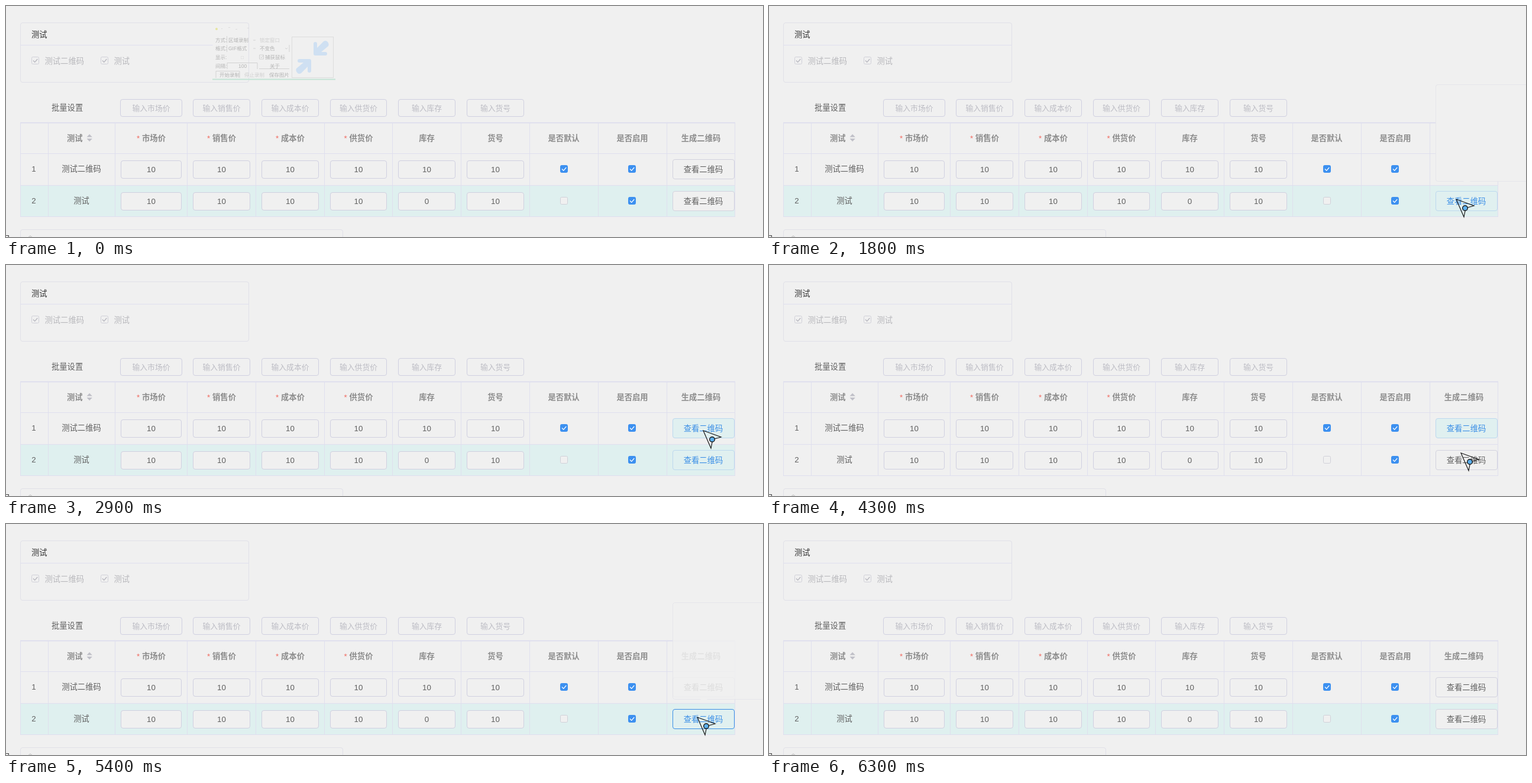
An HTML page that plays this animation: 1280 by 392 pixels, repeating every 6.4 s.

```html
<!DOCTYPE html>
<html lang="zh">
<head>
<meta charset="utf-8">
<style>
  html, body { margin: 0; height: 100%; overflow: hidden; background: #f0f0f0; }
  svg { display: block; }
  text { font: 13.3px "Liberation Sans", "Noto Sans CJK SC", "Noto Sans CJK", sans-serif; fill: #606060; }
  .mid { text-anchor: middle; }
  .head { font-weight: bold; fill: #8c8c8c; }
  .hint { font-size: 12.8px; fill: #bcbcc4; }
  .off { fill: #b8b8bc; }
  .dark { fill: #303030; }
  .star { fill: #f06a60; }
  .tiny { font-size: 8.5px; fill: #b4b4b4; }
  .faint { fill: #d0d0d0; }
  .line { fill: none; stroke: #dfdfee; }
  .card { fill: none; stroke: #e0e0e8; }
  .field { fill: #f0f0f0; stroke: #d0d0e0; }
  .btn rect { fill: #f0f0f0; stroke: #d2d2de; }
  .btn.hover rect { fill: #e0f0f0; stroke: #bcd8ee; }
  .btn.press rect { stroke: #3a8ee6; }
  .btn.hover text { fill: #3a8ee6; }
  .pop { fill: #f0f0f0; stroke: #e5e5ea; }
</style>
</head>
<body>
<svg id="stage" width="1280" height="392" viewBox="0 0 1280 392"></svg>
<script>
const stage = document.getElementById('stage');
const parts = [];
const add = s => parts.push(s);
const textAt = (x, y, s, cls = '') => `<text x="${x}" y="${y + 4.8}" class="${cls}">${s}</text>`;
const text = (...a) => add(textAt(...a));
const mid = (x, y, s, cls = '') => text(x, y, s, 'mid ' + cls);
const box = (x, y, w, h, cls, r = 3.5) =>
  `<rect x="${x + .5}" y="${y + .5}" width="${w}" height="${h}" rx="${r}" class="${cls}"/>`;
const path = (d, attrs) => `<path d="${d}" ${attrs}/>`;

function check(x, y, on, disabled) {
  const blue = on && !disabled;
  add(`<rect x="${x + .5}" y="${y + .5}" width="12" height="12" rx="2" fill="${blue ? '#3c90f0' : '#f0f0f0'}" stroke="${blue ? '#3c90f0' : '#d0d0d8'}"/>`);
  if (on) add(path(`M${x + 3} ${y + 6.5}l2.7 2.8 4.6-5.3`, `fill="none" stroke="${blue ? '#fff' : '#b4b4bc'}" stroke-width="1.2"`));
}

// Option card
add(box(24, 28, 386, 101, 'card'));
add(path('M24 66.5H410', 'class="line"'));
text(43, 48, '测试', 'dark');
check(43, 86, true, true);
text(65.5, 93, '测试二维码', 'off');
check(160, 86, true, true);
text(182.5, 93, '测试', 'off');

// Table
const rows = [277, 331];
const edges = [24, 71, 184, 306, 422, 538, 653, 769, 885, 1001, 1117, 1232];
const names = ['市场价', '销售价', '成本价', '供货价', '库存', '货号'];
add('<rect id="row" x="24" y="304" width="1209" height="54" fill="#dff0ef"/>');
add(path('M24 198.3H1233', 'class="line" stroke-width="2"'));
add(path([250, 304, 357].map(y => `M24 ${y}.5H1233`).join(''), 'class="line"'));
add(path(edges.map(x => `M${x}.5 198V358`).join(''), 'class="line"'));

text(77, 172, '批量设置');
text(103, 224, '测试', 'head');
add(path('M136.5 222.5l4.7-5 4.7 5zM136.5 225l4.7 5 4.7-5z', 'fill="#c0c0c8"'));

names.forEach((name, i) => {
  const [left, right] = edges.slice(i + 2, i + 4);
  const x = left + 10, w = right - left - 20, c = (left + right) / 2 + .5;
  const grow = i ? 0 : 1; // the first batch field is a little wider
  add(box(x - grow, 158, w + 2 * grow, 29, 'field'));
  mid(c, 173, '输入' + name, 'hint');
  if (i < 4) {
    text(c - 24.5, 224, '*', 'star');
    mid(c + 4.5, 224, name, 'head');
  } else mid(c, 224, name, 'head');
  rows.forEach((y, r) => {
    add(box(x, y - 15, w, 30, 'field'));
    mid(c, y, r && i === 4 ? 0 : 10);
  });
});

mid(943, 224, '是否默认', 'head');
mid(1059, 224, '是否启用', 'head');
mid(1175, 224, '生成二维码', 'head');
rows.forEach((y, r) => {
  mid(47, y - .5, r + 1);
  mid(127.5, y - .5, r ? '测试' : '测试二维码');
  check(937, y - 7, !r);
  check(1052, y - 7, true);
  add(`<g id="btn${r}" class="btn">${box(1127, y - 17, 104, 33, '')}${textAt(1179, y, '查看二维码', 'mid')}</g>`);
});

// Next section
add(box(24, 379, 545, 40, 'card'));
add(path('M37 393l4-3 4 3', 'fill="none" stroke="#b8b8b8"'));
text(-6, 395, '号', 'dark');

// Popovers
add(`<g id="pop0"><rect x="1128" y="226" width="152" height="23" fill="#f0f0f0"/>
  <path d="M1174 248.500h12l-6 6z" fill="#f0f0f0"/></g>`);
add(`<g id="pop1">${box(1127, 133, 160, 164, 'pop')}
  <path d="M1174 297h12l-6 6z" fill="#f0f0f0"/></g>`);

// Fading recorder window
const tiny = (x, y, s, cls = '') => textAt(x, y - 1.8, s, 'tiny ' + cls);
const arrow = 'M-13 7l12-10h-7q-3 0-3-3t3-3h17q3 0 3 3v17q0 3-3 3t-3-3v-7l-11 11q-3 2-6 0-4-4-2-8z';
add(`<g id="tool">
  <rect x="349.500" y="47" width="60" height="77" fill="#f0f0f0"/>
  <circle cx="356" cy="39" r="2" fill="#e6e6a0"/>
  <path d="M364 38.500h2m10-2h3m9 3h3m17-2h3" stroke="#dcdcdc"/>
  ${['方式:', '格式:', '显示:', '间隔:'].map((s, i) => tiny(354, 57.5 + i * 14.7, s)).join('')}
  ${tiny(376, 57.5, '区域录制')}${tiny(429, 57.5, '锁定窗口', 'faint')}
  ${tiny(376, 72, 'GIF格式')}${tiny(429, 72, '不变色')}
  ${tiny(397, 87, '□', 'faint')}${tiny(438, 87, '捕获鼠标')}
  ${tiny(393, 101.5, '100')}${tiny(446, 101.5, '关于')}
  ${tiny(361, 117, '开始录制')}${tiny(403, 117, '停止录制', 'faint')}${tiny(445, 117, '保存图片')}
  <path d="M373.500 51v12m0 3v12M418 58h4m-4 14h4m50-1l2 2 2-2m3-5v12M374 107V96.500h51V107M355 122v-11.500h40V122M428 106.500h51M428.500 83h7v7h-7zM430 86l2 2 3-4" fill="none" stroke="#d2d2d2"/>
  <rect x="483.500" y="52.500" width="70" height="69" fill="none" stroke="#dcdcdc"/>
  <g fill="#cfe0f2"><path d="${arrow}" transform="translate(504 99)"/>
  <path d="${arrow}" transform="translate(532 75) rotate(180)"/></g>
  <path d="M349 124.500H557" stroke="#c4e4d6" stroke-width="2"/></g>`);

add(`<g id="cursor"><path d="M0 0L30 11 16 15 13 30z" fill="none" stroke="#181818" stroke-width="1.2"/>
  <circle cx="15" cy="15" r="4.300" fill="#5cb0ee" stroke="#181818" stroke-width="1.400"/></g>`);

stage.innerHTML = parts.join('');
const el = id => document.getElementById(id);
const [row, btn0, btn1, pop0, pop1, tool, cursor] =
  ['row', 'btn0', 'btn1', 'pop0', 'pop1', 'tool', 'cursor'].map(el);

// time, x, y of the pointer tip
const route = [
  [100, 390, 108], [300, 720, 200], [500, 1110, 272], [700, 1165, 268], [1000, 1165, 268],
  [1400, 1164, 335], [1800, 1162, 328], [2100, 1162, 328], [2300, 1163, 342], [2600, 1166, 335],
  [2900, 1179, 281], [3300, 1175, 266], [4100, 1172, 264], [4300, 1170, 319], [4500, 1170, 326],
  [5400, 1169, 328], [5600, 1169, 330], [5800, 1110, 392], [6000, 700, 395], [6200, 425, 47]
];

function pointer(t) {
  const i = Math.max(1, route.findIndex(p => p[0] >= t));
  const [a, x, y] = route[i - 1], [b, u, v] = route[i];
  const k = (t - a) / (b - a);
  return [x + (u - x) * k, y + (v - y) * k];
}

function draw(t) {
  const within = (...spans) => spans.some(([a, b]) => t >= a && t < b);
  const fade = (...spans) => Math.max(0, ...spans.map(([a, b]) => Math.min(1, (t - a) / 300, (b - t) / 300)));
  const show = (node, on) => node.setAttribute('opacity', +on);

  show(tool, t < 100);
  show(row, within([0, 800], [1500, 3000], [4400, 6400]));
  show(pop0, fade([600, 1400], [3500, 4200]));
  show(pop1, fade([1500, 2700], [4500, 5660]));
  btn0.classList.toggle('hover', within([600, 1500], [2800, 4500]));
  btn1.classList.toggle('hover', within([1400, 3400], [4400, 5800]));
  btn0.classList.toggle('press', within([700, 800], [3500, 3600], [4000, 4100]));
  btn1.classList.toggle('press', within([1500, 1600], [2400, 2500], [4500, 4600], [5400, 5500]));

  const seen = within([100, 6250]);
  show(cursor, seen);
  if (seen) cursor.setAttribute('transform', `translate(${pointer(Math.min(t, 6200)).map(Math.round)})`);
}

const start = performance.now();
function tick(now) {
  const t = Math.max(0, now - start) % 6400;
  draw(Math.floor(t / 100) * 100);
  requestAnimationFrame(tick);
}
draw(0);
requestAnimationFrame(tick);
</script>
</body>
</html>
```
